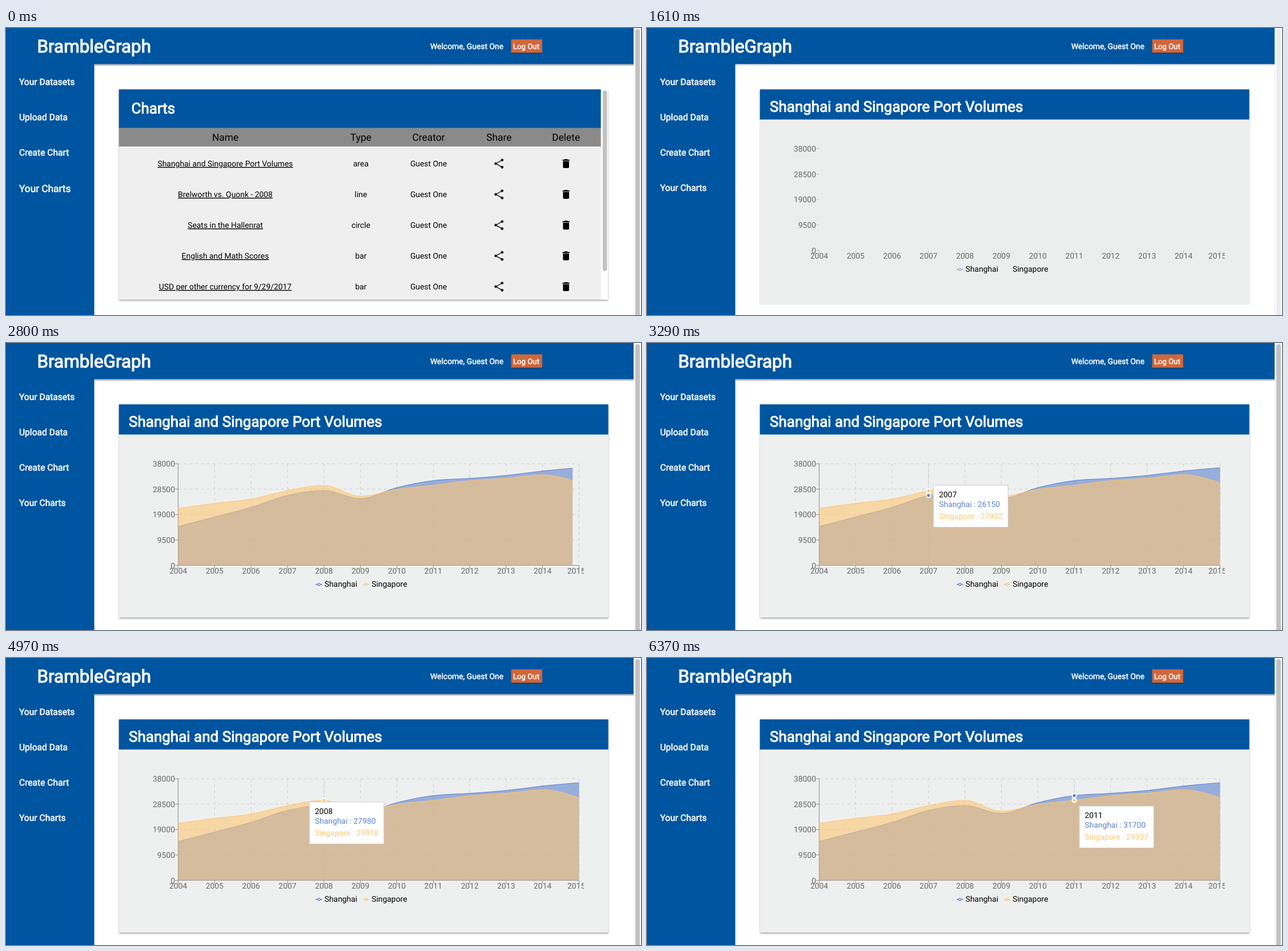
Recreate the animation shown at these times as an HTML page. Size 1112x504 px, loop 6.44 s.

```html
<!DOCTYPE html>
<html lang="en">
<head>
<meta charset="utf-8">
<title>Charts dashboard</title>
<style>
html, body { margin: 0; width: 100%; height: 100%; overflow: hidden; background: #fff; }
svg { display: block; width: 1112px; height: 504px; font-family: Roboto, Arial, sans-serif; font-size: 13.9px; text-rendering: geometricPrecision; }
.bold { fill: #fff; stroke: #fff; stroke-width: .035em; }
.mid { text-anchor: middle; }
.link { text-decoration: underline 1px; text-underline-offset: 1px; }
.link.hover { fill: #fff; stroke: #fff; stroke-width: .35px; }
.axis { fill: #666; }
.lift { filter: drop-shadow(0 2px 1.5px rgba(0, 0, 0, .33)); }
.press { filter: drop-shadow(0 1px .5px rgba(0, 0, 0, .45)); }
</style>
</head>
<body>
<svg id="stage" viewBox="0 0 1112 504"></svg>
<script>
const LOOP = 6440, STEP = 70;
const HOVER = 700, OPEN = 1540, GRID_IN = 1680, PALE_END = 1750;
const REVEAL = 1610, REVEAL_TIME = 1430, GLIDE = 400;
const BLUE = '#0055a0', BLUE_SERIES = '#5e82cd', ORANGE_SERIES = '#ffc675';
const USER = 'Guest One';

const series = [
  { name: 'Shanghai', color: BLUE_SERIES,
    values: [14557, 18084, 21710, 26150, 27980, 25002, 29069, 31700, 32529, 33617, 35285, 36516] },
  { name: 'Singapore', color: ORANGE_SERIES,
    values: [21329, 23192, 24792, 27932, 29918, 25866, 28431, 29937, 31649, 32579, 33869, 30922] }
];
// time, hovered year index, tooltip top
const hovers = [[2870, 3, 249.5], [4860, 4, 256], [5210, 5, 258], [5560, 6, 259.5], [5910, 7, 259.5]];
const charts = [
  ['Shanghai and Singapore Port Volumes', 'area'],
  ['Brelworth vs. Quonk - 2008', 'line'],
  ['Seats in the Hallenrat', 'circle'],
  ['English and Math Scores', 'bar'],
  ['USD per other currency for 9/29/2017', 'bar']
];

const X = i => 301.5 + i * 702 / 11;
const Y = v => 390.5 - 178.5 * v / 38000;
const years = [...Array(12).keys()];
const levels = [0, 9500, 19000, 28500, 38000];

const text = (x, y, s, attrs = '') => `<text x="${x}" y="${y}" ${attrs}>${s}</text>`;
const mid = (x, y, s, size = 13.9) => text(x, y, s, `class="mid" style="font-size:${size}px"`);
const bold = (x, y, s, size, attrs = '') => text(x, y, s, `class="bold" style="font-size:${size}px" ${attrs}`);
const rect = (x, y, w, h, fill, attrs = '') =>
  `<rect x="${x}" y="${y}" width="${w}" height="${h}" fill="${fill}" ${attrs}/>`;
const line = (x1, y1, x2, y2, color, attrs = '') =>
  `<line x1="${x1}" y1="${y1}" x2="${x2}" y2="${y2}" stroke="${color}" ${attrs}/>`;

function ease(x) {
  if (x <= 0) return 0;
  if (x >= 1) return 1;
  const bez = (a, b, u) => 3 * a * u * (1 - u) ** 2 + 3 * b * u * u * (1 - u) + u ** 3;
  let lo = 0, hi = 1;
  for (let i = 0; i < 30; i++) {
    const u = (lo + hi) / 2;
    if (bez(.25, .25, u) < x) lo = u; else hi = u;
  }
  return bez(.1, 1, lo);
}

// Monotone cubic through equally spaced points
function curve(values) {
  const dx = X(1) - X(0), ys = values.map(Y), last = ys.length - 1;
  const slope = i => (ys[i + 1] - ys[i]) / dx;
  const tangent = i => {
    const a = slope(i - 1), b = slope(i);
    return (Math.sign(a) + Math.sign(b)) * Math.min(Math.abs(a), Math.abs(b), Math.abs(a + b) / 4);
  };
  const m = ys.map((_, i) => i > 0 && i < last ? tangent(i) : 0);
  m[0] = (3 * slope(0) - m[1]) / 2;
  m[last] = (3 * slope(last - 1) - m[last - 1]) / 2;
  let d = `M${X(0)} ${ys[0]}`;
  for (let i = 0; i < last; i++) {
    d += `C${X(i) + dx / 3} ${ys[i] + m[i] * dx / 3} ${X(i + 1) - dx / 3} ${ys[i + 1] - m[i + 1] * dx / 3} ${X(i + 1)} ${ys[i + 1]}`;
  }
  return d;
}

const shareIcon = y => `<g transform="translate(863.3 ${y})" fill="#222" stroke="#222">
  <path d="M5.5-6.3L-5.5 0L5.5 6.3" fill="none" stroke-width="1.5"/>
  <g stroke="none"><circle cx="5.5" cy="-6.3" r="2.4"/><circle cx="-5.7" r="2.4"/><circle cx="5.5" cy="6.3" r="2.4"/></g></g>`;
const trashIcon = y => `<path transform="translate(980.7 ${y}) scale(.88) translate(-12 -12)"
  d="M6 19c0 1.1.9 2 2 2h8c1.1 0 2-.9 2-2V7H6zM19 4h-3.5l-1-1h-5l-1 1H5v2h14z"/>`;

function listView() {
  const heads = [[384, 'Name'], [621.5, 'Type'], [740, 'Creator'], [863.3, 'Share'], [980.7, 'Delete']];
  const rows = charts.map(([name, type], i) => {
    const y = 238.2 + 54 * i, base = 243 + 54 * i;
    return text(384, base, name, `class="mid link" ${i ? '' : 'id="picked"'}`) +
      mid(621.5, base, type) + mid(740, base, USER) + shareIcon(y) + trashIcon(y);
  }).join('');
  return rect(198, 209, 844, 268, '#efefef', 'id="rows"') +
    rect(1042, 108, 12, 369, '#fff') +
    rect(197.7, 107.7, 844, 68.1, BLUE) + rect(197.7, 175.8, 844, 32.7, '#8a8a8a') +
    rect(198, 208.5, 844, 1, '#fff') +
    rect(1045, 110, 7.5, 317, '#c1c1c1', 'rx="3.7" class="thumb"') +
    bold(219.5, 150.2, 'Charts', 26) +
    heads.map(([x, s]) => mid(x, 198, s, 17.35)).join('') + rows;
}

function legendItem(s, x) {
  return `<g class="mark" stroke="${s.color}" stroke-width="1.4">${line(x, 424, x + 12, 424, s.color)}
    <circle cx="${x + 6}" cy="424" r="2.1" fill="#eef0f0"/></g>` + text(x + 15.7, 427.7, s.name);
}

function chartView() {
  const dash = 'stroke-dasharray="5 5"';
  const grid = levels.map(v => line(301.5, Y(v), 1003.5, Y(v), '#ccc', dash)).join('') +
    years.map(i => line(X(i), 212, X(i), 390.5, '#ccc', dash)).join('');
  const axes = line(301.5, 212, 301.5, 390.5, '#8c8c8c') + line(301.5, 390.5, 1003.5, 390.5, '#8c8c8c');
  const ticks = levels.map(v => line(296, Y(v), 301.5, Y(v), '#8c8c8c')).join('') +
    years.map(i => line(X(i), 390.5, X(i), 396.5, '#8c8c8c')).join('');
  const labels = levels.map(v => text(296, Y(v) + 5, v, 'text-anchor="end" class="axis"')).join('') +
    years.map(i => text(i < 11 ? X(i) : 998.6, 405, 2004 + i, 'class="mid axis"')).join('');
  const areas = series.map(s => {
    const d = curve(s.values);
    return `<path d="${d}V390.5H301.5Z" fill="${s.color}" fill-opacity=".6"/>
      <path d="${d}" fill="none" stroke="${s.color}"/>`;
  }).join('');
  return rect(197.7, 107.7, 857, 53, BLUE) + bold(215, 146.5, 'Shanghai and Singapore Port Volumes', 26) +
    line(0, 212, 0, 390.5, '#d6d8d8', 'id="cursor"') +
    `<g id="grid">${grid}${axes}</g><g id="ticks">${ticks}</g>
    <g clip-path="url(#reveal)">${areas}</g>
    <g clip-path="url(#plot)">${labels}</g>` +
    legendItem(series[0], 542) + legendItem(series[1], 624.5) +
    `<g id="hover">${series.map(s => `<circle class="dot" r="3.6" fill="${s.color}" stroke="#fff" stroke-width="2"/>`).join('')}
      <g id="tip">${rect(.5, .5, 130.5, 73.5, '#fff', 'stroke="#ccc"')}
        ${text(10, 21, '', 'class="tip"')}
        ${series.map((s, i) => text(10, 38.8 + 20.3 * i, '', `class="tip" style="fill:${s.color}"`)).join('')}
      </g></g>`;
}

const nav = ['Your Datasets', 'Upload Data', 'Create Chart', 'Your Charts'];
document.getElementById('stage').innerHTML = `
  <defs>
    <clipPath id="reveal"><rect id="wipe" x="301" y="200" width="0" height="192"/></clipPath>
    <clipPath id="plot"><rect x="198" y="161" width="814" height="320"/></clipPath>
    <linearGradient id="fade" x2="0" y2="1"><stop stop-color="#9a9a9a"/><stop offset="1" stop-color="#fff"/></linearGradient>
  </defs>
  ${rect(0, 0, 1112, 504, '#fff')}
  ${rect(155, 63.5, 944, 4, 'url(#fade)', 'id="shade"')}
  ${rect(0, 0, 1099, 63.5, BLUE)}${rect(0, 0, 154.6, 504, BLUE)}
  ${line(1099.5, 0, 1099.5, 504, '#ececec')}
  ${rect(1102, 2, 8, 520, '#c1c1c1', 'rx="4" class="thumb"')}
  ${bold(54.5, 42.8, 'BrambleGraph', 31.4)}
  ${bold(743, 36.6, `Welcome, ${USER}`, 13.9)}
  ${rect(884.7, 20, 54.3, 23.5, '#d0673c', 'id="button"')}
  ${bold(888, 36.6, 'Log Out', 13.2)}
  ${nav.map((s, i) => bold(23, 100.1 + 62.1 * i, s, 15.6, `id="nav${i}"`)).join('')}
  <rect id="card" y="108"/>
  <g id="list">${listView()}</g>
  <g id="chart">${chartView()}</g>`;

const $ = id => document.getElementById(id);
const all = sel => [...document.querySelectorAll(sel)];
const set = (el, attrs) => { for (const k in attrs) el.setAttribute(k, attrs[k]); };
const show = (el, on) => { el.style.display = on ? '' : 'none'; };
const thumbs = all('.thumb'), dots = all('.dot'), tips = all('.tip'), marks = all('.mark');

// The tooltip glides from wherever it is to each new target
function tipAt(t) {
  let pos = null, index = 0;
  hovers.forEach(([start, i, top], n) => {
    if (t < start) return;
    const end = n + 1 < hovers.length ? Math.min(t, hovers[n + 1][0]) : t;
    const goal = [X(i) + 9, top], from = pos || goal, k = ease((end - start) / GLIDE);
    pos = from.map((p, j) => p + (goal[j] - p) * k);
    index = i;
  });
  return { pos, index };
}

function draw(t) {
  const open = t >= OPEN, pale = t >= HOVER && t < PALE_END;
  show($('list'), !open);
  show($('chart'), open);
  $('picked').setAttribute('class', t >= HOVER ? 'mid link hover' : 'mid link');
  $('nav3').style.fontSize = open ? '15.6px' : '17.3px';
  $('nav3').setAttribute('y', open ? 286.2 : 287.7);

  const grow = pale ? 1.5 : 0;
  set($('card'), {
    x: 198 - grow, width: (open ? 857 : 856) + 2 * grow, height: (open ? 374 : 369) + (pale ? 4 : 0),
    rx: pale ? 4 : 0, fill: pale ? '#eceeee' : open ? '#eef0f0' : '#fff', class: pale ? '' : 'lift'
  });
  set($('rows'), { fill: pale ? '#eceeee' : '#efefef' });
  set($('shade'), { opacity: pale ? .35 : 1 });
  set($('button'), { class: pale && !open ? '' : 'press' });
  thumbs.forEach(el => set(el, { fill: pale ? '#eceeee' : '#c1c1c1' }));
  if (!open) return;

  const ready = t >= GRID_IN;
  show($('grid'), ready);
  set($('ticks'), { opacity: ready ? 1 : .5 });
  marks.forEach((el, i) => set(el, { opacity: ready ? 1 : i ? 0 : .6 }));
  set($('wipe'), { width: 703 * ease((t - REVEAL) / REVEAL_TIME) });

  const { pos, index } = tipAt(t);
  show($('hover'), pos);
  show($('cursor'), pos);
  if (!pos) return;
  set($('cursor'), { x1: X(index), x2: X(index) });
  set($('tip'), { transform: `translate(${pos[0] - .7} ${pos[1]})` });
  tips[0].textContent = 2004 + index;
  series.forEach((s, i) => {
    set(dots[i], { cx: X(index), cy: Y(s.values[index]) });
    tips[i + 1].textContent = `${s.name} : ${s.values[index]}`;
  });
}

const begin = performance.now();
function tick() {
  const t = (performance.now() - begin) % LOOP;
  draw(Math.floor(t / STEP) * STEP);
  requestAnimationFrame(tick);
}
tick();
</script>
</body>
</html>
```
